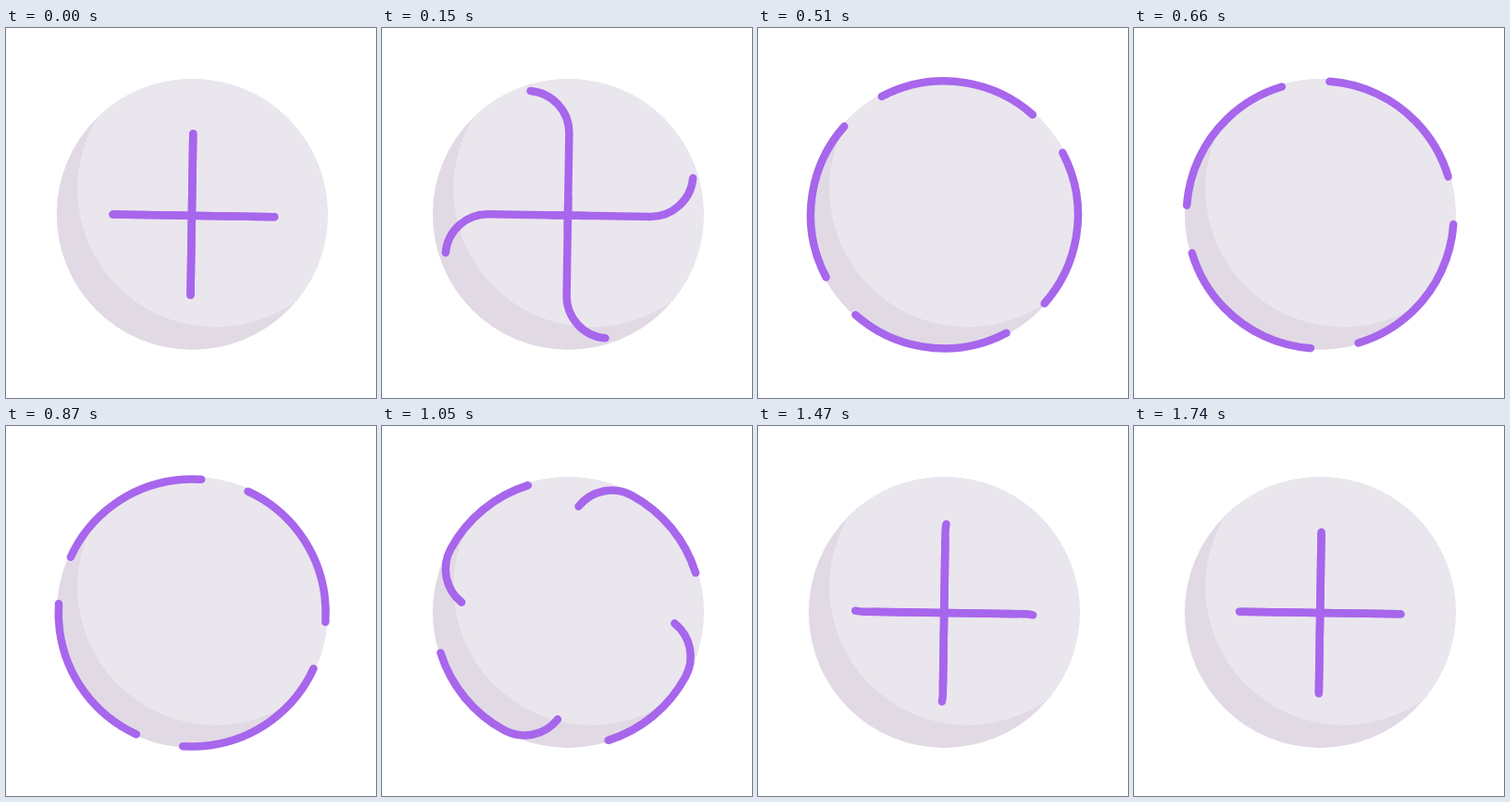
Write an HTML page that moves like this. It is 400x400 px and loops after 3860 ms.

```html
<!DOCTYPE html>
<html lang="en">
<head>
<meta charset="utf-8">
<title>Spinning plus</title>
<style>
  html, body { margin: 0; width: 100%; height: 100%; overflow: hidden; background: #fff; }
  svg { display: block; width: 100%; height: 100%; }
</style>
</head>
<body>
<svg viewBox="0 0 400 400">
  <defs>
    <clipPath id="disc"><circle cx="201.3" cy="201.4" r="146.5"/></clipPath>
  </defs>
  <circle cx="201.3" cy="201.4" r="146.5" fill="#e1dae5"/>
  <circle cx="226.5" cy="174" r="149.3" fill="#eae6ed" clip-path="url(#disc)"/>
  <g id="strokes" fill="none" stroke="#a766ec" stroke-width="8.5" stroke-linecap="round"></g>
</svg>
<script>
const LOOP = 3860;
const CX = 201.2, CY = 202, TILT = 0.9;
const R = 144.5;                              // ring radius
const HALF = 87.3;                            // half length of a bar
const BEND = (R * R - HALF * HALF) / (2 * R); // bend tangent to bar and ring
const ANGLE = Math.atan2(HALF, BEND);
const SWEEP = 2.5 * Math.PI + 2 * ANGLE;      // run along the ring
const TRAVEL = 2 * HALF + 2 * BEND * (Math.PI - ANGLE) + R * SWEEP;

// [time, distance moved along the track]
const KEYS = [
  [0, 0], [270, 174], [510, 548], [660, 921], [870, 1323], [1080, 1636],
  [1260, TRAVEL - 54.5], [1440, TRAVEL - 14], [1620, TRAVEL - 1.5], [1740, TRAVEL]
];
const slopes = KEYS.slice(1).map(([t, d], i) => (d - KEYS[i][1]) / (t - KEYS[i][0]));
const tangents = KEYS.map((k, i) =>
  i === 0 || i === KEYS.length - 1 ? 0 : 2 * slopes[i - 1] * slopes[i] / (slopes[i - 1] + slopes[i]));

function distance(t) {
  if (t >= 1740) return TRAVEL;
  const i = KEYS.findIndex(k => k[0] > t) - 1;
  const [t0, d0] = KEYS[i], [t1, d1] = KEYS[i + 1];
  const h = t1 - t0, u = (t - t0) / h, v = 1 - u;
  return v * v * (1 + 2 * u) * d0 + u * u * (3 - 2 * u) * d1
    + h * u * v * (v * tangents[i] - u * tangents[i + 1]);
}

// Bar, bend, counterclockwise run on the ring, bend, bar
function track() {
  const arc = (r, x, y) => `A${r} ${r} 0 0 0 ${x} ${y}`;
  let d = `M0 ${HALF}V${-HALF}`;
  for (let i = 0; i <= 4; i++) {
    const a = ANGLE - Math.PI - SWEEP * i / 4;
    d += arc(i ? R : BEND, R * Math.cos(a), R * Math.sin(a));
  }
  return d + arc(BEND, HALF, 0) + `H${-HALF}`;
}

const group = document.getElementById('strokes');
const strokes = [0, 1, 2, 3].map(() => {
  const path = document.createElementNS('http://www.w3.org/2000/svg', 'path');
  path.setAttribute('d', track());
  path.setAttribute('stroke-dasharray', `${2 * HALF} 5000`);
  return group.appendChild(path);
});

function draw(t) {
  const moved = distance(t), drift = Math.max(0, 1 - t / 600);
  strokes.forEach((path, i) => {
    const [dx, dy] = i % 2 ? [1.7, 0.8] : [-0.3, -0.5];
    path.setAttribute('stroke-dashoffset', -moved);
    path.setAttribute('transform',
      `translate(${CX + dx * drift} ${CY + dy * drift}) rotate(${TILT + 90 * i})`);
  });
}

const begin = performance.now();
function tick() {
  draw((performance.now() - begin) % LOOP);
  requestAnimationFrame(tick);
}
tick();
</script>
</body>
</html>
```
